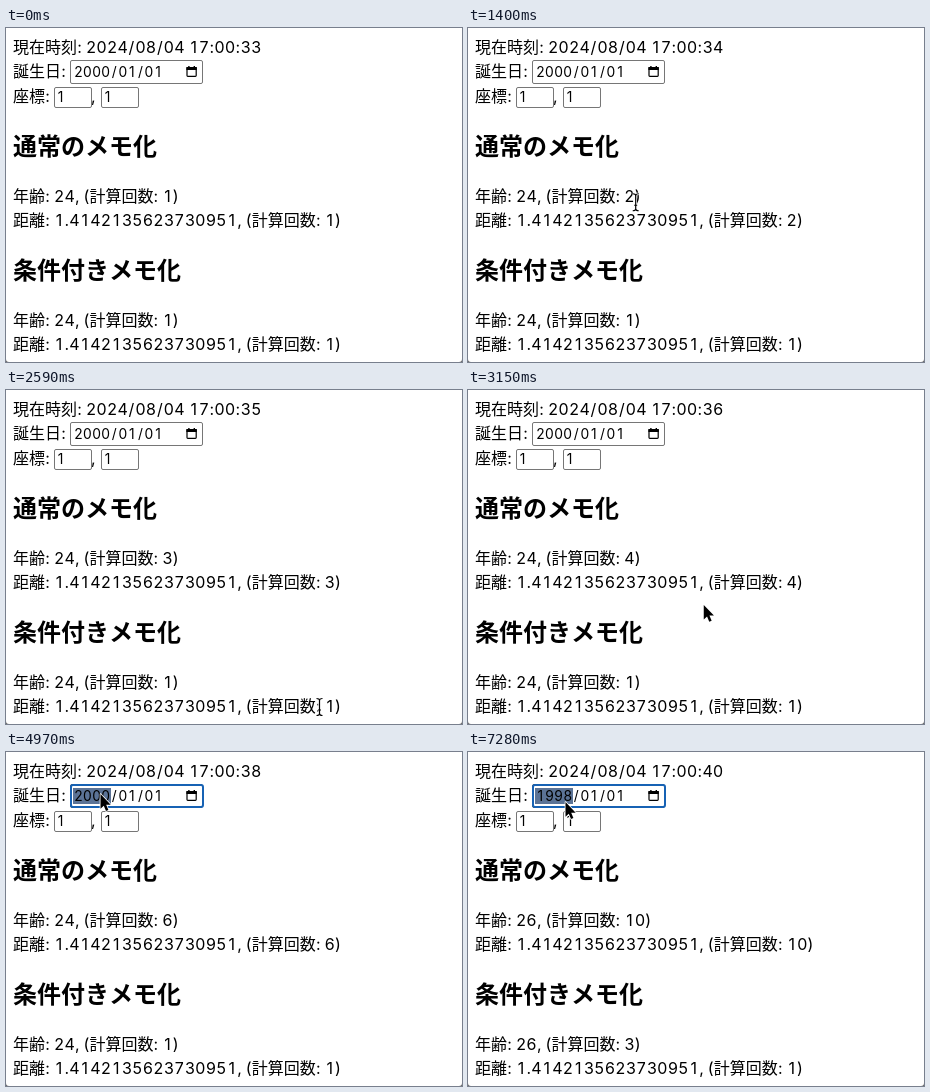
Write an HTML page that moves like this. It is 456 px wide and 334 px high and loops after 8000 ms.

```html
<!DOCTYPE html>
<html lang="ja">
<head>
<meta charset="utf-8">
<title>条件付きメモ化</title>
<style>
  html, body { margin: 0; width: 100%; height: 100%; overflow: hidden; background: #fff; }
  svg { display: block; width: 456px; height: 334px; }
  text { font: 16px Inter, "Noto Sans CJK JP", sans-serif; font-feature-settings: "calt" 0; fill: #000; }
  .cell { text-anchor: middle; }
  .head { font: 700 24px "Noto Sans CJK JP", sans-serif; }
  .field { font-size: 13.8px; }
  .box { fill: #fff; stroke: #767676; }
</style>
</head>
<body>
<svg viewBox="0 0 456 334">
  <g id="page">
    <rect id="date" class="box" x="64.5" y="32.5" width="132" height="23" rx="1.5"/>
    <rect class="box" x="48.5" y="59.5" width="37" height="20" rx="1.5"/>
    <rect class="box" x="95.5" y="59.5" width="37" height="20" rx="1.5"/>
    <g id="focus">
      <rect x="67" y="36" width="38" height="16" fill="#5b7396"/>
      <rect x="65" y="33" width="132" height="22" rx="2" fill="none" stroke="#1762b4" stroke-width="2"/>
    </g>
    <g id="calendar" transform="translate(-.6 0)">
      <rect x="181.6" y="39.6" width="9.2" height="8.8" rx=".8" fill="none" stroke="#000" stroke-width="1.2"/>
      <path d="M181 39h10.4v3H181zM182.8 38h1.4v2h-1.4zM188.2 38h1.4v2h-1.4z"/>
    </g>
    <text class="head" x="7" y="127">通常のメモ化</text>
    <text class="head" x="7" y="251">条件付きメモ化</text>
  </g>
  <path d="M0 334v-3q0 3 3 3zM456 334v-3q0 3-3 3z" fill="#666"/>
  <g id="cursor">
    <path id="arrow" transform="translate(0 .6)" d="M0 0V14.6L3.3 11.6 5.5 16.8 7.9 15.8 5.7 10.7H10.2Z" stroke="#fff" stroke-width="1.6" stroke-linejoin="round" paint-order="stroke"/>
    <g id="beam" fill="none">
      <path d="M-3-8.5Q0-8.5 0-6.5Q0-8.5 3-8.5M0-6.5V6.5M-3 8.5Q0 8.5 0 6.5Q0 8.5 3 8.5M-1.5 3H1.5" stroke="#fff" stroke-width="2.6"/>
      <path d="M-3-8.5Q0-8.5 0-6.5Q0-8.5 3-8.5M0-6.5V6.5M-3 8.5Q0 8.5 0 6.5Q0 8.5 3 8.5M-1.5 3H1.5" stroke="#000" stroke-width="1.2"/>
    </g>
  </g>
</svg>
<script>
const LOOP = 8000, STEP = 70, LEFT = 7;
const $ = id => document.getElementById(id);
const page = $('page');

// Advance of each kind of glyph in the 16px face
const narrow = { ':': 5, ' ': 3.8, ',': 4.8, '.': 4.8, '/': 7.4, '(': 6, ')': 6 };
const bodyAdvance = c => narrow[c] || (/\d/.test(c) ? 10.5 : 16);
const fieldAdvance = c => c === '/' ? 8 : 9.1;

function makeText(x, y, advance = bodyAdvance, cls = '') {
  const node = document.createElementNS('http://www.w3.org/2000/svg', 'text');
  node.setAttribute('class', 'cell ' + cls);
  node.setAttribute('y', y);
  page.append(node);
  const line = {
    x, y, end: x,
    set(value) {
      if (node.textContent === value) return;
      let pen = x;
      const centers = [...value].map(c => {
        const w = advance(c);
        pen += w;
        return (pen - w / 2).toFixed(2);
      });
      line.end = pen;
      node.setAttribute('x', centers.join(' '));
      node.textContent = value;
    }
  };
  return line;
}

const fixed = (x, y, value, ...style) => {
  const line = makeText(x, y, ...style);
  line.set(value);
  return line;
};

const clock = makeText(LEFT, 25);
const ages = [174, 298].map(y => makeText(LEFT, y));
const dists = [198, 322].map(y => makeText(LEFT, y));
const birth = makeText(67.8, 49, fieldAdvance, 'field');
const labels = [fixed(LEFT, 49, '誕生日:'), fixed(LEFT, 74, '座標:'), fixed(85, 74, ',')];
fixed(50, 74, '1', fieldAdvance, 'field');
fixed(97, 74, '1', fieldAdvance, 'field');

const lines = [clock, ...ages, ...dists, ...labels];
const headings = [{ x: LEFT, end: 151, y: 127 }, { x: LEFT, end: 175, y: 251 }];

// Pointer path: time, x, y
const path = [
  [140, 176, 24], [420, 166, 55], [490, 166, 55], [770, 163.5, 56.5],
  [910, 163.5, 56.5], [1330, 168, 165], [1750, 164, 290], [1820, 163.5, 288],
  [1960, 163.5, 288], [2590, 313.5, 317], [2730, 318.5, 315.5],
  [2800, 318.5, 315.5], [3640, 98.5, 46.5], [3920, 96, 46],
  [3990, 96, 46], [4130, 94.5, 41.5], [6160, 94.5, 41.5],
  [6300, 94.5, 49.5], [7140, 94.5, 49.5], [7280, 97.5, 49.5], [LOOP, 97.5, 49.5]
];

function pointerAt(t) {
  const i = Math.max(1, path.findIndex(k => k[0] > t));
  const [t0, x0, y0] = path[i - 1], [t1, x1, y1] = path[i];
  const p = Math.max(0, (t - t0) / (t1 - t0));
  const e = p * p * (3 - 2 * p);
  return { x: x0 + (x1 - x0) * e, y: y0 + (y1 - y0) * e };
}

const show = (id, on) => $(id).setAttribute('visibility', on ? 'visible' : 'hidden');

function overText({ x, y }) {
  const hit = (l, up, down) => x >= l.x && x <= l.end && y > l.y - up && y < l.y + down;
  return lines.some(l => hit(l, 16, 5)) || headings.some(l => hit(l, 24, 6));
}

function render(time) {
  const t = Math.floor(time / STEP) * STEP;
  const ticks = Math.floor((t + 280) / 1050);
  const edits = (t >= 5250) + (t >= 6790);
  const runs = 1 + ticks + edits;

  clock.set(`現在時刻: 2024/08/04 17:00:${33 + ticks}`);
  birth.set(`${2000 - edits}/01/01`);
  [runs, 1 + edits].forEach((n, i) => ages[i].set(`年齢: ${24 + edits}, (計算回数: ${n})`));
  [runs, 1].forEach((n, i) => dists[i].set(`距離: ${Math.SQRT2}, (計算回数: ${n})`));

  const p = pointerAt(t);
  const visible = t >= 140;
  const hover = visible && p.x > 64 && p.x < 197 && p.y > 32 && p.y < 55;
  const beam = !hover && overText(p);
  $('date').style.stroke = hover ? '#4f4f4f' : '';
  show('focus', t >= 4060);
  show('arrow', visible && !beam);
  show('beam', visible && beam);
  $('cursor').setAttribute('transform', `translate(${p.x.toFixed(2)} ${p.y.toFixed(2)})`);
}

const start = performance.now();
function loop() {
  render((performance.now() - start) % LOOP);
  requestAnimationFrame(loop);
}
loop();
</script>
</body>
</html>
```
